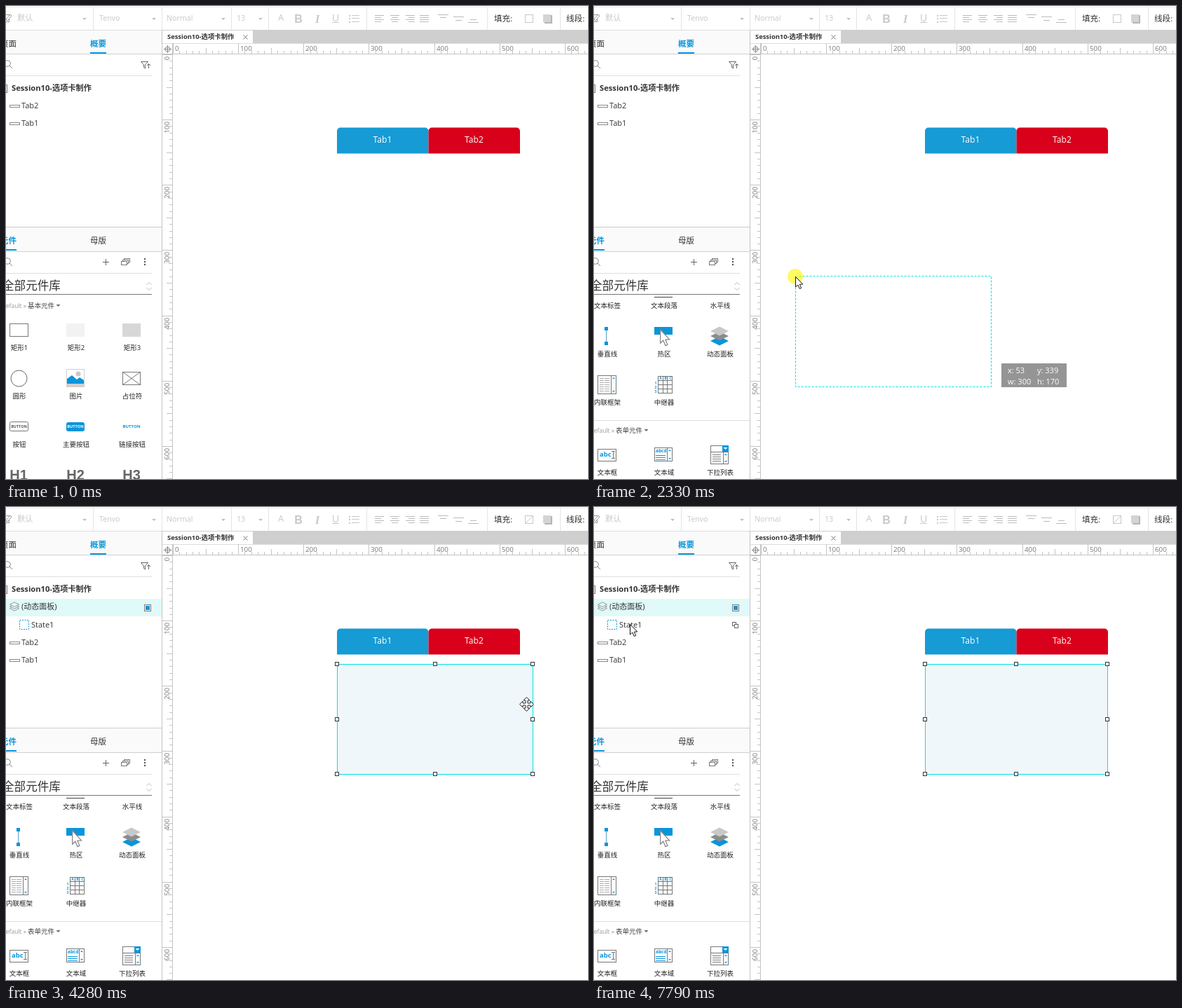
An HTML page with a canvas that plays this animation: 830x675 px, repeating every 8000 ms.

```html
<!DOCTYPE html>
<html lang="zh">
<head>
<meta charset="utf-8">
<title>Prototype editor</title>
<style>
html, body { margin: 0; width: 100%; height: 100%; overflow: hidden; background: #fff; }
canvas { display: block; }
</style>
</head>
<body>
<canvas id="stage" width="830" height="675"></canvas>
<script>
const ctx = document.getElementById('stage').getContext('2d');
const LOOP = 8000, SCALE = 0.9315, LEFT = 238, TOP = 69, WIDE = 751, NARROW = 732;
const BLUE = '#0a95da', CYAN = '#00e0e0', TINT = '#e0f9f9', DIM = '#c8c8c8', GREY = '#777', INK = '#333';
const SANS = '"Open Sans", "Noto Sans CJK SC", "Noto Sans CJK", sans-serif';
const GROTESK = '"Liberation Sans", sans-serif', SERIF = '"Liberation Serif", serif';

// Drawing helpers
const rect = (x, y, w, h, color) => { ctx.fillStyle = color; ctx.fillRect(x, y, w, h); };
const frame = (x, y, w, h, color) => {
  ctx.strokeStyle = color; ctx.lineWidth = 1; ctx.strokeRect(x + .5, y + .5, w - 1, h - 1);
};
const paint = (fill, stroke) => {
  if (fill) { ctx.fillStyle = fill; ctx.fill(); }
  if (stroke) { ctx.strokeStyle = stroke; ctx.lineWidth = 1; ctx.stroke(); }
};
const shape = (points, fill, stroke, open) => {
  ctx.beginPath();
  points.forEach(([x, y]) => ctx.lineTo(x, y));
  if (!open) ctx.closePath();
  paint(fill, stroke);
};
const circle = (x, y, r, fill, stroke) => { ctx.beginPath(); ctx.arc(x, y, r, 0, 7); paint(fill, stroke); };
const round = (x, y, w, h, r, fill, stroke) => { ctx.beginPath(); ctx.roundRect(x, y, w, h, r); paint(fill, stroke); };
const rows = (x, ys, w, color) => ys.forEach(y => rect(x, y, w, 1, color));
const caret = (x, y, color, r = 3) => shape([[x - r, y], [x + r, y], [x, y + r]], color);
// y is the middle of the letters
const text = (s, x, y, size, color, { align = 'left', weight = 400, family = SANS } = {}) => {
  ctx.font = `${weight} ${size}px ${family}`;
  ctx.textAlign = align;
  ctx.fillStyle = color;
  ctx.fillText(s, x, Math.round(y + size * .36));
};
const at = (x, y, draw) => { ctx.save(); ctx.translate(x, y); draw(); ctx.restore(); };
const clipped = (x, y, w, h, draw) => {
  ctx.save(); ctx.beginPath(); ctx.rect(x, y, w, h); ctx.clip(); draw(); ctx.restore();
};
const mid = { align: 'center' }, bold = { weight: 700 };

// Pointers
const arrow = (fill = '#fff', stroke = '#111') => shape(
  [[.5, .5], [.5, 15], [3.8, 12], [6.3, 17.5], [8.7, 16.5], [6.3, 11.2], [10.8, 11]], fill, stroke);
// Arrows pointing out from the centre, one per quarter turn listed
const spokes = turns => {
  const spoke = [[-1.5, -1.5], [-1.5, -5.5], [-4.5, -5.5], [0, -10], [4.5, -5.5], [1.5, -5.5], [1.5, -1.5]];
  shape(turns.flatMap(turn => {
    const c = Math.cos(turn * Math.PI / 2), s = Math.sin(turn * Math.PI / 2);
    return spoke.map(([x, y]) => [.5 + x * c - y * s, .5 + x * s + y * c]);
  }), '#fff', '#222');
};

// Library icons, each around its own centre
const layers = (w, h, gap, fills, stroke) => fills.forEach((fill, i) => {
  const y = (1 - i) * gap;
  shape([[-w, y], [0, y - h], [w, y], [0, y + h]], fill, stroke);
});
const buttonText = (color, size = 5.4) => text('BUTTON', 0, 0, size, color, { align: 'center', weight: 700 });
const heading = n => () => text('H' + n, 0, 0, 20, '#666', { align: 'center', weight: 700, family: GROTESK });
const rule = () => {
  rect(-13, 0, 26, 1, '#5a9fc4');
  rect(-13, -2, 5, 5, BLUE); rect(8, -2, 5, 5, BLUE);
};
const scroller = (x, y, h) => {
  frame(x, y, 8, h, GREY);
  shape([[x + 2, y + 5], [x + 4, y + 3], [x + 6, y + 5]], BLUE);
  caret(x + 4, y + h - 5, BLUE, 2);
};
const letterA = (x, size) => text('A', x, 0, size, BLUE, { align: 'center', weight: 700, family: SERIF });

const icons = {
  矩形1: () => frame(-13, -9, 27, 19, GREY),
  矩形2: () => rect(-13, -9, 26, 19, '#f2f2f2'),
  矩形3: () => rect(-13, -9, 26, 19, '#d7d7d7'),
  圆形: () => circle(.5, .5, 11.5, null, '#666'),
  图片: () => {
    rect(-13, -13, 26, 26, '#d0d0d0');
    rect(-12, -12, 24, 20, '#fff');
    circle(4, -6, 3.5, '#c8c8c8');
    shape([[-12, 8], [-12, 1], [-5, -4], [2, 2], [6, -1], [12, 3], [12, 8]], BLUE);
  },
  占位符: () => {
    frame(-13, -9, 26, 19, GREY);
    shape([[-13, -9], [13, 10]], null, GREY, true);
    shape([[-13, 10], [13, -9]], null, GREY, true);
  },
  按钮: () => { round(-12.5, -6.5, 26, 13, 2, null, GREY); at(.5, 0, () => buttonText('#555')); },
  主要按钮: () => { round(-13, -6, 26, 13, 3, BLUE); buttonText('#fff', 5.6); },
  链接按钮: () => buttonText(BLUE, 6),
  一级标题: heading(1), 二级标题: heading(2), 三级标题: heading(3),
  文本标签: () => { letterA(-5, 22); rect(4, 7, 10, 1, '#555'); },
  文本段落: () => {
    letterA(-5, 23);
    rows(3, [-11, -7, -3, 1], 10, '#444');
    rows(-13, [5, 9, 13], 26, '#444');
  },
  水平线: rule,
  垂直线: () => { ctx.rotate(Math.PI / 2); rule(); },
  热区: () => {
    rect(-13, -13, 26, 11, BLUE);
    at(-5, -10, () => { ctx.scale(1.25, 1.35); arrow('#fff', '#888'); });
  },
  动态面板: () => layers(13, 6.5, 7, [BLUE, '#8c8c8c', '#c8c8c8']),
  内联框架: () => {
    frame(-13, -13, 27, 27, GREY);
    rows(-10, [-9, -6, -3, 0, 3, 6, 9], 6, '#aaa');
    rows(-3, [-9, -6, -3, 0, 3, 6, 9], 7, '#aaa');
    scroller(6, -13, 27);
  },
  中继器: () => {
    [...'ABC'].forEach((c, i) => {
      text(c, -4 + i * 7, -9, 5, BLUE, { align: 'center', weight: 700 });
      text(i + 1, -11, -2 + i * 6, 5, BLUE, { align: 'center', weight: 700 });
    });
    for (let i = 0; i < 4; i++) rect(-8 + i * 6.7 | 0, -12, 1, 25, GREY);
    rows(-8, [-12, -6, 0, 6, 12], 21, GREY);
  },
  文本框: () => {
    frame(-13, -8, 27, 18, GREY);
    text('abc', -10, 0, 9.5, BLUE, bold);
    rect(9, -5, 1, 11, GREY); rows(7, [-5, 5], 5, GREY);
  },
  文本域: () => {
    frame(-13, -10, 26, 20, GREY);
    text('abcd', -11, -5, 6.5, BLUE, bold);
    rows(-11, [1, 4, 7], 14, BLUE);
    scroller(5, -10, 20);
  },
  下拉列表: () => {
    frame(-13, -13, 26, 10, GREY);
    frame(-13, -4, 26, 18, GREY);
    rect(4, -13, 9, 9, BLUE); caret(8.5, -10, '#fff');
    rows(-10, [0, 3, 6, 9], 12, GREY);
    scroller(5, -4, 18);
  },
};
const names = Object.keys(icons);
names.splice(20, 0, null); // one empty slot ends the first group
const tileLabelY = row => 488 + 69 * row + (row > 6 ? 31 : 0);

// Pointer path: start, end, number of hops, target
const moves = [
  [150, 470, 5, 97, 516], [1710, 1940, 4, 161, 489], [2170, 2960, 11, 476, 232],
  [3180, 3350, 3, 471, 224], [4170, 4280, 2, 742, 281], [4350, 4430, 2, 752, 303],
  [4580, 4750, 3, 754, 305], [5130, 5440, 5, 737, 305], [6000, 6620, 8, 722, 311],
  [7000, 7790, 11, 51, 167],
];
function pointerAt(t) {
  let x = 607, y = 620;
  for (const [from, to, hops, tx, ty] of moves) {
    if (t < from) break;
    const hop = Math.floor((t - from) / (to - from) * (hops - 1) + 1e-6) + 1;
    const eased = 1 - (1 - Math.min(1, hop / hops)) ** 1.6;
    x += (tx - x) * eased;
    y += (ty - y) * eased;
  }
  return { x: Math.round(x), y: Math.round(y) };
}
const scrollAt = t => 112 * [620, 1250, 1400].filter(s => t >= s).length;

function toolbar(hasPanel) {
  rect(0, 1, 830, 1, '#ececec');
  [124, 222, 321, 374, 514, 686, 790].forEach(x => rect(x, 2, 1, 32, '#e4e4e4'));
  [112, 211, 310, 363].forEach(x => caret(x, 17, '#c0c0c0'));
  frame(-6, 12, 11, 11, '#999');
  shape([[0, 19], [6, 12], [8, 14], [2, 21]], '#fff', '#999');
  text('默认', 16, 17, 11.2, DIM);
  text('Tenvo', 133, 17, 10.7, DIM);
  text('Normal', 229, 17, 10.7, DIM);
  text('13', 329, 17, 10.7, DIM);
  text('A', 392, 16, 13, DIM, mid);
  text('B', 417, 18, 16, DIM, { align: 'center', weight: 700, family: GROTESK });
  text('I', 444, 18, 16, DIM, { align: 'center', weight: 'italic 700', family: SERIF });
  text('U', 470, 17, 14, DIM, mid);
  rect(465, 23, 10, 1, DIM);
  [13, 17, 22].forEach(y => { rect(489, y, 2, 2, DIM); rect(493, y, 11, 1, DIM); });
  [526, 548, 570, 590].forEach((x, i) => [13, 16, 19, 22].forEach((y, k) => {
    const short = i < 3 && k % 2 ? 4 : 0;
    rect(x + short * i / 2, y, 13 - short, 1, '#bbb');
  }));
  [[616, 12, 4], [638, 15, 5], [659, 23, -4]].forEach(([x, y, d]) => {
    rect(x, y, 15, 1, '#bbb'); rect(x + 3, y + d, 9, 1, '#bbb');
  });
  text('填充:', 696, 18, 11.6, INK);
  text('线段:', 799, 18, 11.6, INK);
  frame(740, 12, 12, 12, DIM);
  if (hasPanel) shape([[741, 23], [751, 13]], null, DIM, true);
  rect(768, 13, 11, 12, '#b5b5b5');
  rect(766, 12, 11, 11, '#d4d4d4');
}

function rulers() {
  rect(222, 34, 608, 19, '#cfcfcf');
  rect(223, 35, 129, 19, '#fff');
  text('Session10-选项卡制作', 230, 44, 9.4, INK, bold);
  shape([[338.5, 41.5], [344.5, 47.5]], null, GREY, true);
  shape([[344.5, 41.5], [338.5, 47.5]], null, GREY, true);
  rect(223, 53, 607, 1, '#ddd');
  rect(223, 68, 607, 1, '#c4c4c4');
  rect(237, 53, 1, 622, '#c4c4c4');
  circle(230.5, 61.5, 3.5, null, '#888');
  rect(225, 61, 11, 1, '#888'); rect(230, 56, 1, 11, '#888');
  for (let i = 0; i < 66; i++) {
    const d = Math.round(i * 10 * SCALE), len = i % 10 ? i % 5 ? 4 : 8 : 15;
    rect(LEFT + d, 68 - len, 1, len, '#c4c4c4');
    rect(237 - len, TOP + d, len, 1, '#c4c4c4');
    if (i % 10) continue;
    text(i * 10, LEFT + d + 3, 60.5, 9.8, GREY);
    at(230, TOP + d + 3, () => { ctx.rotate(-Math.PI / 2); text(i * 10, 0, -.2, 9.8, GREY, { align: 'right' }); });
  }
}

function search(y) {
  circle(2, y - 1, 4.3, null, '#888');
  shape([[5, y + 2], [9, y + 6]], null, '#888', true);
}

function outline(hasPanel, pointer) {
  rect(0, 35, 222, 33, '#fafafa');
  rect(0, 34, 222, 1, '#ddd');
  text('页面', -8, 54, 11.5, INK);
  text('概要', 120, 54, 11.5, BLUE, bold);
  rect(120, 66, 23, 2, BLUE);
  rect(0, 68, 222, 1, '#d0d0d0');
  search(83);
  shape([[192.5, 79.5], [202.5, 79.5], [198.5, 84], [198.5, 89], [196.5, 87.5], [196.5, 84]], null, '#666');
  shape([[201, 85], [203.5, 82.5], [206, 85]], null, '#666', true);
  rect(203, 83, 1, 6, '#666');
  rect(0, 99, 208, 1, '#e0e0e0');
  frame(-8, 112, 10, 12, GREY);
  text('Session10-选项卡制作', 8, 117, 11.2, INK, bold);
  if (hasPanel) {
    rect(0, 131, 222, 25, TINT);
    at(12, 142, () => layers(6.5, 3.3, 2.8, [TINT, TINT, TINT], '#999'));
    text('(动态面板)', 22, 142, 11, INK);
    rect(197, 139, 10, 10, '#fff');
    frame(197, 139, 10, 10, GREY);
    rect(199, 141, 6, 6, BLUE);
    ctx.setLineDash([2, 1.5]);
    frame(19, 161, 14, 14, BLUE);
    ctx.setLineDash([]);
    text('State1', 36, 168, 11, INK);
    if (pointer.x < 222 && pointer.y > 156 && pointer.y < 181) {
      frame(197, 164, 6, 6, '#666');
      rect(200, 167, 6, 6, '#fff');
      frame(200, 167, 6, 6, '#666');
    }
  }
  ['Tab2', 'Tab1'].forEach((name, i) => {
    const y = 142 + 25.3 * i + (hasPanel ? 51 : 0) | 0;
    frame(5, y - 1, 15, 4, '#888');
    text(name, 22, y, 11, INK);
  });
}

function library(t, pointer) {
  rect(0, 315, 222, 1, '#ccc');
  rect(0, 316, 222, 34, '#fafafa');
  text('元件', -8, 335, 11.5, BLUE, bold);
  rect(0, 347, 15, 2, BLUE);
  text('母版', 120, 335, 11.5, INK);
  rect(0, 350, 222, 1, '#d0d0d0');
  search(365);
  rect(138, 365, 9, 1, '#666'); rect(142, 361, 1, 9, '#666');
  [[168, 360], [166, 362], [164, 364]].forEach(([x, y]) => { rect(x, y, 9, 6, '#fff'); frame(x, y, 9, 6, '#777'); });
  [361, 365, 369].forEach(y => circle(198, y, 1.2, '#555'));
  rect(0, 381, 208, 1, '#e0e0e0');
  text('全部元件库', -5, 399.4, 16.6, INK);
  rect(0, 411, 208, 1, '#777');
  shape([[200.5, 398], [204, 394.5], [207.5, 398]], null, '#bbb', true);
  shape([[200.5, 402], [204, 405.5], [207.5, 402]], null, '#bbb', true);

  const scroll = scrollAt(t);
  const hovering = t >= 470 && t < 2170;
  clipped(0, 414, 222, 261, () => at(0, -scroll, () => {
    [['基本元件', 428], ['表单元件', 942]].forEach(([name, y]) => {
      text('Default »', 29, y, 8.5, '#999', { align: 'right' });
      text(name, 31, y, 9.5, '#444');
      caret(74.5, y - 2, '#666', 3);
    });
    rect(0, 927, 222, 1, '#ddd');
    names.forEach((name, i) => {
      if (!name) return;
      const col = i % 3, x = [18, 99, 179][col], y = tileLabelY(i / 3 | 0);
      const inRow = Math.abs(pointer.y + scroll - y + 10.5) < 34;
      if (hovering && inRow && Math.floor((pointer.x + 20.5) / 80) === col) {
        round(x - 38.5, y - 44, 79, 68, 3, TINT);
      }
      at(x, y - 26, icons[name]);
      text(name, x + 1, y, 9.5, '#222', mid);
    });
  }));
  if (hovering) round(215, 418, 5, 44, 2, '#d8d8d8');
}

function sizeTag(x, y, right, bottom) {
  const units = n => Math.round(n / SCALE);
  rect(right + 15, bottom - 33, 93, 34, '#959595');
  text('x: ' + units(x - LEFT), right + 24, bottom - 23, 11, '#fff');
  text('y: ' + units(y - TOP), right + 66, bottom - 23, 11, '#fff');
  text('w: ' + units(right - x + .5), right + 24, bottom - 7, 11, '#fff');
  text('h: ' + units(bottom - y + .5), right + 66, bottom - 7, 11, '#fff');
}

function page(t, pointer, hasPanel, right) {
  round(472, 173.5, 130.5, 37, [5, 5, 0, 0], '#169bd5');
  round(602.5, 173.5, 130.5, 37, [5, 5, 0, 0], '#d9001b');
  text('Tab1', 537, 191, 12.1, '#fff', mid);
  text('Tab2', 667.5, 191, 12.1, '#fff', mid);
  if (hasPanel) {
    rect(472, 224, right - 472, 158, '#eff7fa');
    frame(472, 224, right - 471, 158, CYAN);
    const centre = Math.round((472 + right) / 2);
    for (const x of [472, centre, right]) for (const y of [224, 303, 381]) {
      if (x === centre && y === 303) continue;
      rect(x - 3, y - 3, 6, 6, '#fff');
      frame(x - 3, y - 3, 6, 6, INK);
    }
    if (t >= 4580 && t < 5920) {
      if (right === NARROW) rect(right, 164, 1, 227, CYAN);
      sizeTag(472, 224, right, 381);
    }
  } else if (t >= 2170 && pointer.x > LEFT) {
    const snapped = Math.abs(pointer.x - 472) < 6;
    const x = snapped ? 472 : pointer.x, y = pointer.y - (snapped ? 0 : 1);
    ctx.setLineDash([3, 2]);
    frame(x, y, 280, 159, CYAN);
    ctx.setLineDash([]);
    if (snapped) rect(472, 164, 1, y + 3, CYAN);
    sizeTag(x, y, x + 279, y + 158);
  }
}

function drawPointer(t, { x, y }, hasPanel, right) {
  if (t < 150) return;
  const pressed = t >= 2170 && t < 4030 || t >= 4580 && t < 5920;
  const fade = t >= 3730 && t < 4030 ? .5 : 1;
  if (pressed) circle(x, y, 11, `rgba(255,248,0,${.62 * fade})`);
  const inside = hasPanel && x > 472 && x < right && y > 224 && y < 382;
  at(x, y, () => {
    if (t >= 4430 && t < 5920) spokes([1, 3]);
    else if (inside) spokes([0, 1, 2, 3]);
    else arrow();
  });
}

function draw() {
  const t = performance.now() % LOOP;
  const pointer = pointerAt(t), hasPanel = t >= 4170;
  let right = t < 5130 ? WIDE : t < 5440 ? pointer.x - 3 : NARROW;
  if (Math.abs(right - NARROW) < 4) right = NARROW;
  rect(0, 0, 830, 675, '#fff');
  toolbar(hasPanel);
  rulers();
  outline(hasPanel, pointer);
  library(t, pointer);
  rect(222, 35, 1, 640, '#c4c4c4');
  clipped(LEFT, TOP, 592, 606, () => page(t, pointer, hasPanel, right));
  drawPointer(t, pointer, hasPanel, right);
  requestAnimationFrame(draw);
}
draw();
</script>
</body>
</html>
```
